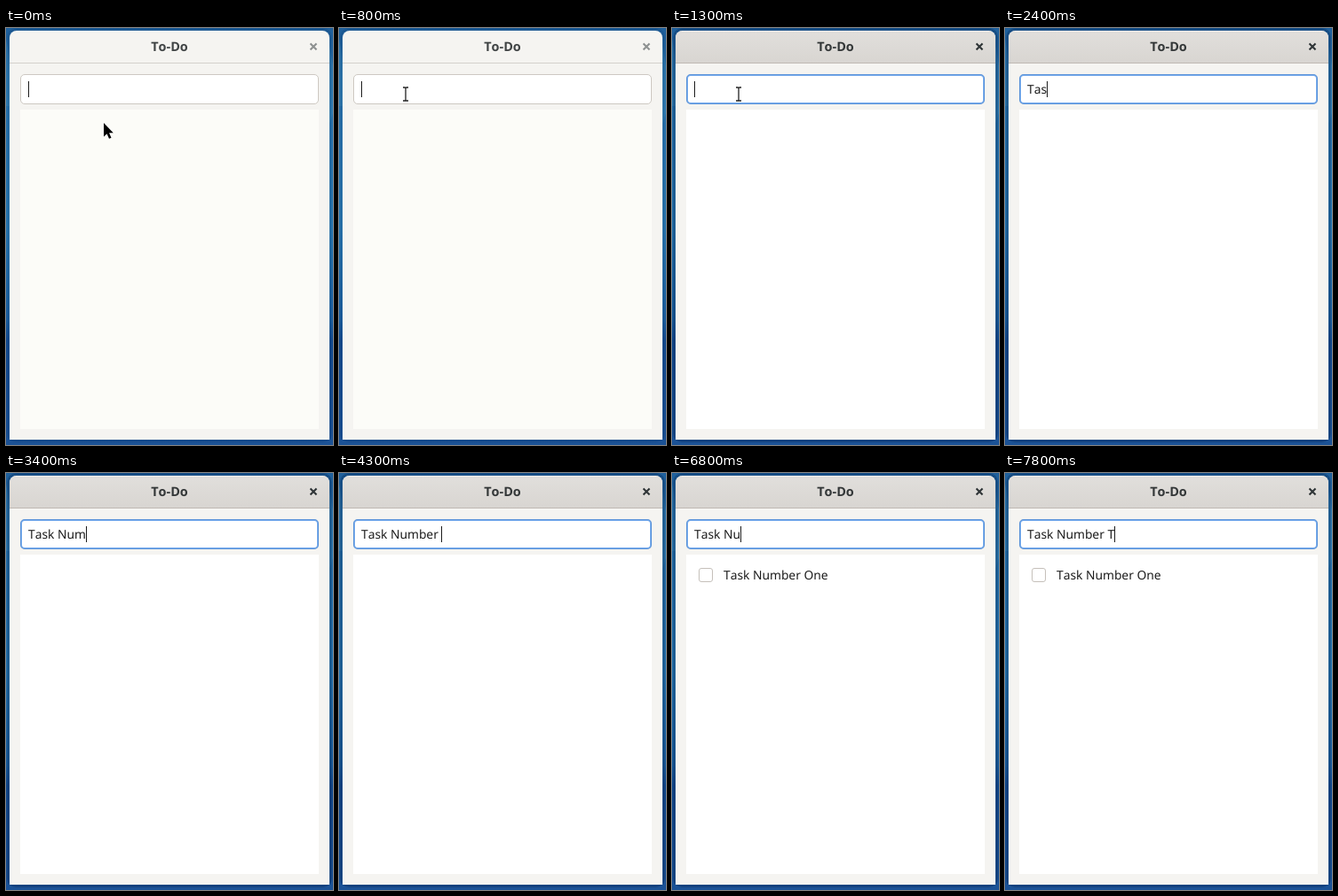
Animation, 368 px wide and 470 px high, one loop 8 s. Source, as an HTML page:

```html
<!DOCTYPE html>
<html lang="en">
<meta charset="utf-8">
<title>To-Do</title>
<style>
html, body { margin: 0; width: 100%; height: 100%; overflow: hidden; background: #1b5c9c; }
svg { display: block; }
text { font: 13.8px "Noto Sans", "Open Sans", sans-serif; font-kerning: none; text-rendering: geometricPrecision; fill: #1c1c1c; }
#title { font-size: 14.4px; font-weight: 700; text-anchor: middle; fill: #333738; }
</style>
<svg width="368" height="470" viewBox="0 0 368 470">
  <defs>
    <linearGradient id="sky" x2="0" y2="1">
      <stop offset="0" stop-color="#1f609c"/>
      <stop offset=".2" stop-color="#2a77b1"/>
      <stop offset=".48" stop-color="#2a7ab4"/>
      <stop offset=".7" stop-color="#1c61a2"/>
      <stop offset=".75" stop-color="#134c92"/>
      <stop offset="1" stop-color="#1b5296"/>
    </linearGradient>
    <linearGradient id="bar" x2="0" y2="1">
      <stop offset="0" stop-color="#e1dfdc"/>
      <stop offset="1" stop-color="#d8d5d1"/>
    </linearGradient>
  </defs>
  <rect width="368" height="470" fill="url(#sky)"/>
  <path d="M0 12q4 20 4 34V88H0zM364 20l4 22V96l-4 12z" fill="#3d8dbd" opacity=".45"/>
  <rect id="shade" x="2.5" y="1.5" width="363" height="464" rx="9" fill="none" stroke="#032654" stroke-width="3"/>

  <path d="M4 464V11a8 8 0 0 1 8-8H356a8 8 0 0 1 8 8V464z" fill="#f5f4f1"/>
  <g id="active">
    <path d="M4 40V11a8 8 0 0 1 8-8H356a8 8 0 0 1 8 8V40z" fill="url(#bar)"/>
    <path d="M11 3.5H357" stroke="#efeeec"/>
  </g>
  <path id="edge" d="M4 39.5H364"/>
  <text id="title" x="184" y="26">To-Do</text>
  <path id="close" d="M342.5 17.5l7 7m0-7l-7 7" stroke-width="2.1"/>

  <rect x="16.5" y="52.5" width="335" height="33" rx="4.5" fill="#fff" stroke="#cdc8c2"/>
  <rect id="ring" fill="none" stroke-width="2"/>
  <rect id="list" x="16" y="92" width="336" height="360"/>
  <text id="entry" x="25" y="74"></text>
  <rect id="caret" y="60" width="1" height="18" fill="#1c1c1c"/>

  <g id="item">
    <rect x="30.5" y="107.5" width="15" height="15" rx="2.5" fill="#fff" stroke="#c5c0ba"/>
    <text x="58" y="120">Task Number One</text>
  </g>

  <path id="arrow" d="M0 0V15.5L3.6 12.3 6 17.8 8.5 16.7 6.1 11.3H10.8z" stroke="#fff" stroke-width="1" paint-order="stroke"/>
  <g id="beam" fill="none">
    <path id="stem" d="M-3-7.5H-1Q0-7.5 0-6.5V6.5Q0 7.5-1 7.5H-3M3-7.5H1Q0-7.5 0-6.5M0 6.5Q0 7.5 1 7.5H3" stroke="#fff" stroke-width="3.2"/>
    <use href="#stem" style="stroke:#222"/>
    <path d="M-3-7.5H-1Q0-7.5 0-6.5V6.5Q0 7.5-1 7.5H-3M3-7.5H1Q0-7.5 0-6.5M0 6.5Q0 7.5 1 7.5H3" stroke="#222" stroke-width="1.3"/>
  </g>
</svg>
<script>
const $ = id => document.getElementById(id);
const set = (id, attrs) => { for (const k in attrs) $(id).setAttribute(k, attrs[k]); };
const show = (id, on) => set(id, { visibility: on ? 'visible' : 'hidden' });

// Key times, in tenths of a second, for each typed line
const lines = [
  { text: 'Task Number One', keys: [20, 22, 24, 26, 28, 30, 32, 34, 36, 38, 40, 41, 45, 47, 48] },
  { text: 'Task Number T', keys: [56, 58, 59, 61, 63, 65, 68, 70, 72, 74, 75, 76, 78] }
];
const path = [[110, 107], [99, 96], [86, 80], [75, 74.5]];
const focusSteps = [.07, .5, .85, 1];

function draw(ms) {
  const t = Math.floor(ms % 8000 / 100);
  const active = t >= 10, added = t >= 50;

  show('active', active);
  show('item', added);
  set('shade', { opacity: active ? .35 : .15 });
  set('edge', { stroke: active ? '#bfb9b3' : '#d3d0cc' });
  set('title', { opacity: active ? 1 : .93 });
  set('close', { stroke: active ? '#2e3436' : '#8d9090' });
  set('list', { fill: active ? '#fff' : '#fcfcf8' });

  // The focus ring closes in on the entry
  const p = active ? focusSteps[Math.min(t - 10, 3)] : 0, gap = 2 - 3 * p;
  set('ring', {
    x: 16 - gap, y: 52 - gap, width: 336 + 2 * gap, height: 34 + 2 * gap,
    rx: 5 + gap, stroke: p < .1 ? '#777' : '#3584e4', 'stroke-opacity': .7 * p
  });

  const { text, keys } = lines[+added];
  $('entry').textContent = text.slice(0, keys.filter(k => k <= t).length).replace(/ /g, '\u00a0');
  set('caret', { x: Math.round(25 + $('entry').getComputedTextLength()) });

  const [x, y] = path[Math.max(0, Math.min(t - 5, 3))];
  const move = { transform: `translate(${x} ${y})` };
  set('arrow', move);
  set('beam', move);
  show('arrow', t < 7);
  show('beam', t >= 7 && t < 18);
}

const start = performance.now();
function tick() {
  draw(performance.now() - start);
  requestAnimationFrame(tick);
}
tick();
</script>
</html>
```
